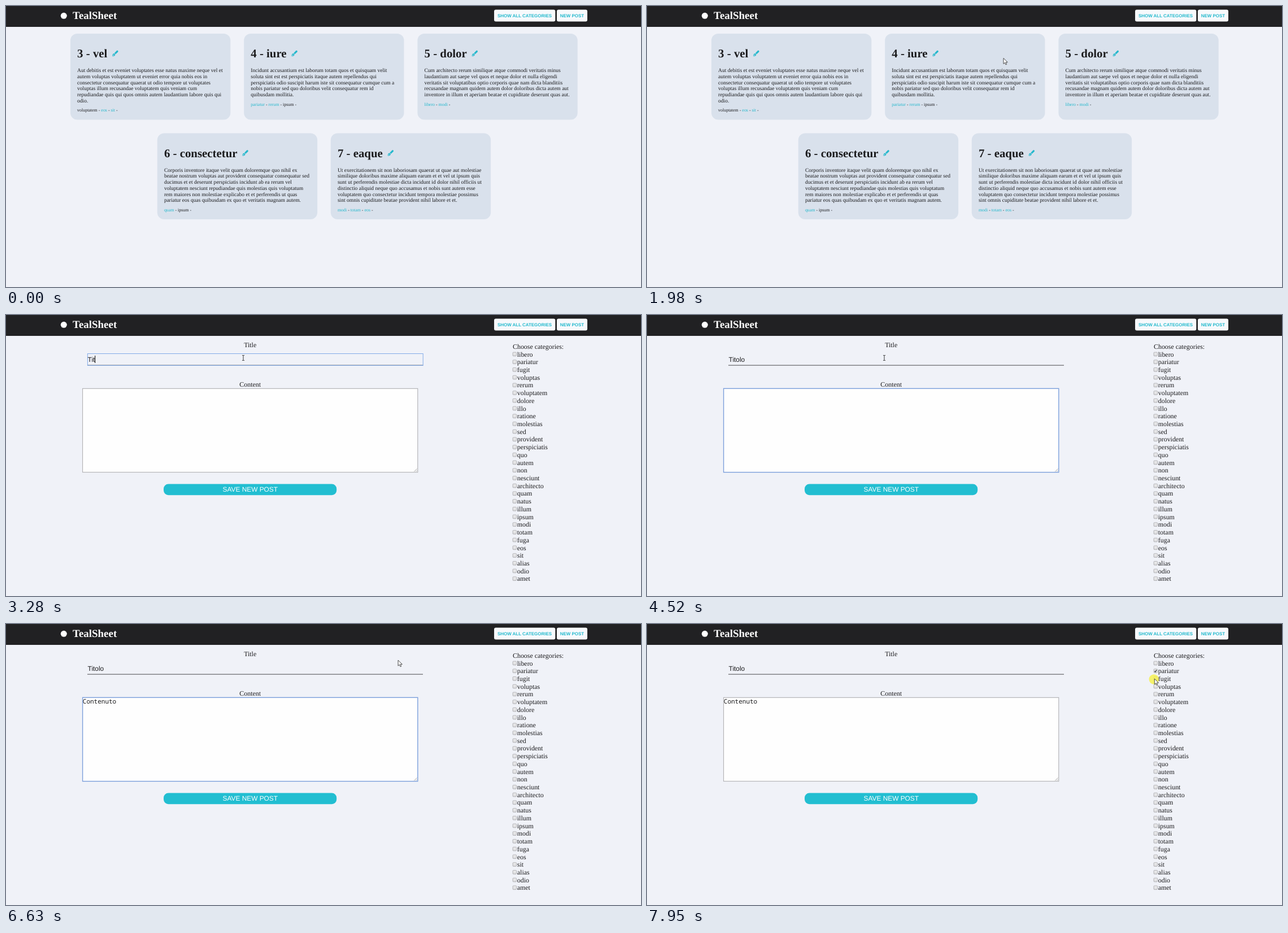
Write an HTML page that moves like this. It is 1124x498 px and loops after 8000 ms.

```html
<!DOCTYPE html>
<html lang="en">
<head>
<meta charset="utf-8">
<title>Blog post form</title>
<style>
  html, body { margin: 0; width: 100%; height: 100%; overflow: hidden; background: #f0f2f8; }
  svg { display: block; width: 100%; height: 100%; }
  text { font-family: "Liberation Serif", Times, serif; font-size: 11.9px; fill: #1b1b1d;
         text-rendering: geometricPrecision; white-space: pre; }
  .logo { font-size: 18.95px; font-weight: bold; fill: #fff; }
  .sans { font-family: "Liberation Sans", Arial, sans-serif; }
  .mono { font-family: "Noto Sans Mono", monospace; font-size: 11px; }
  .nav { font-size: 7.95px; font-weight: bold; fill: #22b9cd; }
  .nav.hover { fill: #212123; }
  .h1 { font-size: 20.85px; font-weight: bold; }
  .body { font-size: 9.52px; }
  .tags { font-size: 7.93px; }
  .link, .pen { fill: #24b8cc; }
  .mid { text-anchor: middle; }
  .save { fill: #fff; }
</style>
</head>
<body>
<svg id="stage" viewBox="0 0 1124 498">
  <defs>
    <linearGradient id="boxFill" x2="0" y2="1">
      <stop offset="0" stop-color="#eeeeef"/><stop offset="1" stop-color="#dcdcde"/>
    </linearGradient>
  </defs>
  <rect width="1124" height="37" fill="#212123"/>
  <circle cx="102.3" cy="17.3" r="5.5" fill="#fff"/>
  <text class="logo" x="118" y="23.4">TealSheet</text>
  <rect x="864" y="6.6" width="108.3" height="20.8" rx="3" fill="#f7f9fc"/>
  <rect x="975" y="6.6" width="54" height="20.8" rx="3" fill="#f7f9fc"/>
  <text class="sans nav" x="870" y="19.7">SHOW ALL CATEGORIES</text>
  <text class="sans nav" id="newPost" x="980.7" y="19.7">NEW POST</text>

  <g id="posts"></g>

  <g id="form">
    <text class="mid" x="432.2" y="56.8">Title</text>
    <rect x="144" y="88.6" width="594" height="1" fill="#4a4a4d"/>
    <rect id="titleRing" x="144.4" y="68.5" width="593.8" height="21" fill="none" stroke="#82abe8"/>
    <text class="sans" id="titleText" x="144.6" y="83"></text>
    <text class="mid" x="432.2" y="127.2">Content</text>
    <rect id="area" x="135.6" y="130.3" width="593.2" height="148.4" fill="#fefefe"/>
    <path d="M722.5 277.5l5-5m-2 5l2-2" stroke="#8d8d90" stroke-width=".8"/>
    <text class="mono" id="areaText" x="135.8" y="141.4"></text>
    <rect id="caret" width="1" height="13"/>
    <rect x="279" y="299.4" width="306.2" height="19.8" rx="8.5" fill="#22bed1"/>
    <text class="sans save mid" x="432.3" y="313.4">SAVE NEW POST</text>
    <text x="897" y="59.9">Choose categories:</text>
    <g id="boxes"></g>
    <path id="tick" d="M898.3 83.4l1.4 1.6 2.3-3.6" fill="none" stroke="#333" stroke-width="1.2"/>
  </g>

  <circle id="click" r="8.8" fill="#f7f13c" opacity=".75"/>
  <g id="pointer">
    <path id="arrow" d="M0 0v10l2.4-2.2 1.6 3.7 1.7-.8-1.6-3.5h3.2z" fill="#fff" stroke="#222" stroke-width=".8"/>
    <path id="beam" d="M-2-4.5h1.5l.5.5.5-.5h1.5M0-4v8M-2 4.5h1.5l.5-.5.5.5h1.5" fill="none" stroke="#222" stroke-width=".9"/>
    <path id="hand" d="M-1 6V.2q0-1 1-1t1 1v4l4 .9q1 .3 1 1.3-.1 3.2-1.4 5.3h-5l-3.2-4.6q0-1.4 2.6.6z" fill="#fff" stroke="#222" stroke-width=".8"/>
  </g>
</svg>
<script>
const LOOP = 8000;
const $ = id => document.getElementById(id);

function add(parent, tag, attrs, content = '') {
  const el = document.createElementNS('http://www.w3.org/2000/svg', tag);
  for (const key in attrs) el.setAttribute(key, attrs[key]);
  el.textContent = content;
  return parent.appendChild(el);
}

const posts = [
  [114, 49, '3 - vel', ['Aut debitis et est eveniet voluptates esse natus maxime neque vel et',
    'autem voluptas voluptatem ut eveniet error quia nobis eos in',
    'consectetur consequatur quaerat ut odio tempore ut voluptates',
    'voluptas illum recusandae voluptatem quis veniam cum',
    'repudiandae quis qui quos omnis autem laudantium labore quis qui',
    'odio.'], ['voluptatem', 'eos', 'sit'], 'voluptatem'],
  [421.2, 49, '4 - iure', ['Incidunt accusantium est laborum totam quos et quisquam velit',
    'soluta sint est est perspiciatis itaque autem repellendus qui',
    'perspiciatis odio suscipit harum iste sit consequatur cumque cum a',
    'nobis pariatur sed quo doloribus velit consequatur rem id',
    'quibusdam mollitia.'], ['pariatur', 'rerum', 'ipsum'], 'ipsum'],
  [728.4, 49, '5 - dolor', ['Cum architecto rerum similique atque commodi veritatis minus',
    'laudantium aut saepe vel quos et neque dolor et nulla eligendi',
    'veritatis sit voluptatibus optio corporis quae nam dicta blanditiis',
    'recusandae magnam quidem autem dolor doloribus dicta autem aut',
    'inventore in illum et aperiam beatae et cupiditate deserunt quas aut.'], ['libero', 'modi']],
  [267.8, 225.5, '6 - consectetur', ['Corporis inventore itaque velit quam doloremque quo nihil ex',
    'beatae nostrum voluptas aut provident consequatur consequatur sed',
    'ducimus et et deserunt perspiciatis incidunt ab ea rerum vel',
    'voluptatem nesciunt repudiandae quis molestias quis voluptatum',
    'rem maiores non molestiae explicabo et et perferendis ut quas',
    'pariatur eos quas quibusdam ex quo et veritatis magnam autem.'], ['quam', 'ipsum'], 'ipsum'],
  [574.8, 225.5, '7 - eaque', ['Ut exercitationem sit non laboriosam quaerat ut quae aut molestiae',
    'similique doloribus maxime aliquam earum et et vel ut ipsum quis',
    'sunt ut perferendis molestiae dicta incidunt id dolor nihil officiis ut',
    'distinctio aliquid neque quo accusamus et nobis sunt autem esse',
    'voluptatem quo consectetur incidunt tempora molestiae possimus',
    'sint omnis cupiditate beatae provident nihil labore et et.'], ['modi', 'totam', 'eos']]
];

const PEN = 'M79 283q-15 5-20 20L0 480l5 5 93-93q-4-40 30-40t32 32-40 30l-93 93 5 5 ' +
  '177-59q15-5 20-20l33-84-99-99zM369 28L186 228l98 98 199-183c85-76-39-199-114-115z';

function drawPost([cardX, cardY, title, lines, tags, plain]) {
  const x = cardX + 12.1, top = cardY + 68.1, step = 10.75, g = $('posts');
  add(g, 'rect', { x: cardX, y: cardY, width: 283.3, height: 152.5, rx: 12, fill: '#d9e1ec' });
  const head = add(g, 'text', { class: 'h1', x, y: cardY + 42.2 }, title);
  const penX = x + head.getComputedTextLength() + 8.6;
  add(g, 'path', { class: 'pen', d: PEN, transform: `translate(${penX} ${cardY + 29.8}) scale(.0208)` });
  lines.forEach((line, i) => add(g, 'text', { class: 'body', x, y: top + step * i }, line));
  const row = add(g, 'text', { class: 'tags', x, y: top + step * lines.length + 5.7 });
  for (const tag of tags) {
    add(row, 'tspan', tag === plain ? {} : { class: 'link' }, tag);
    add(row, 'tspan', {}, ' - ');
  }
}
posts.forEach(drawPost);

const categories = ('libero pariatur fugit voluptas rerum voluptatem dolore illo ratione molestias sed ' +
  'provident perspiciatis quo autem non nesciunt architecto quam natus illum ipsum modi totam fuga ' +
  'eos sit alias odio amet').split(' ');
categories.forEach((name, i) => {
  const y = 69.6 + 13.72 * i;
  add($('boxes'), 'rect', { x: 897.1, y: y - 3.5, width: 6.4, height: 6.6, rx: 1,
    fill: 'url(#boxFill)', stroke: '#a3a3a6', 'stroke-width': .8 });
  add($('boxes'), 'text', { x: 904.8, y: y + 3.9 }, name);
});

// Pointer waypoints: time, x, y
const path = [
  [210, 1058, 362], [520, 1040, 160], [750, 1010, 30], [830, 1003, 18], [1630, 1003, 18],
  [1975, 631, 92.5], [2204, 631, 92.5], [2205, 598, 97], [2430, 420, 76], [6260, 420, 76],
  [6490, 640, 60], [6860, 898, 80], [7040, 898, 80], [7250, 899, 85], [7560, 899, 85],
  [7640, 899, 96], [7790, 898.3, 97]
];
const titleKeys = [2900, 3050, 3280, 3440, 3590, 3820];
const areaKeys = [4670, 4750, 4910, 4980, 5130, 5210, 5300, 5450, 5620];
const clicks = [[840, 990], [2430, 2575], [7420, 7645], [7950, LOOP]];
const BLINK = 530;

const within = (t, from, to) => t >= from && t < to;
const show = (id, on) => $(id).setAttribute('visibility', on ? 'inherit' : 'hidden');
const place = (id, x, y) => $(id).setAttribute('transform', `translate(${x} ${y})`);

const tick = t => 65 + Math.floor((t - 60) / 76.5) * 76.5;

function pointerAt(t) {
  const next = path.findIndex(p => p[0] > t);
  if (next === 0) return path[0].slice(1);
  if (next < 0) return path[path.length - 1].slice(1);
  const [t0, x0, y0] = path[next - 1], [t1, x1, y1] = path[next];
  const k = (t - t0) / (t1 - t0);
  return [x0 + (x1 - x0) * k, y0 + (y1 - y0) * k];
}

function type(id, word, keys, t) {
  const el = $(id), typed = word.slice(0, keys.filter(k => k <= t).length);
  if (el.textContent !== typed) el.textContent = typed;
  return typed ? el.getComputedTextLength() : 0;
}

function drawForm(t) {
  const inTitle = within(t, 2430, 3970), inArea = within(t, 3970, 7490);
  const titleWidth = type('titleText', 'Titolo', titleKeys, t);
  const areaWidth = type('areaText', 'Contenuto', areaKeys, t);
  show('titleRing', inTitle);
  $('area').setAttribute('stroke', inArea ? '#7c9fdb' : '#a9a9ac');
  $('area').setAttribute('stroke-width', inArea ? 1.4 : 1);
  const lastKey = [2430, 3970, ...titleKeys, ...areaKeys].filter(k => k <= t).reduce((a, b) => Math.max(a, b), 0);
  const lit = Math.floor((t - lastKey) / BLINK) % 2 === 0;
  show('caret', (inTitle || inArea) && lit);
  place('caret', inTitle ? 144.4 + titleWidth : 135.6 + Math.max(areaWidth - .8, 0), inTitle ? 72 : 131);
  show('tick', t >= 7570);
}

function drawPointer(t) {
  const [x, y] = pointerAt(tick(t)), formOpen = t >= 2210;
  const overButton = !formOpen && within(x, 975, 1029) && within(y, 6, 28);
  const overInput = formOpen && within(x, 144, 738) && within(y, 68, 90);
  $('newPost').classList.toggle('hover', overButton);
  show('pointer', t >= 210);
  show('hand', overButton);
  show('beam', overInput);
  show('arrow', !overButton && !overInput);
  place('pointer', x, y);
  show('click', clicks.some(([from, to]) => within(t, from, to)));
  place('click', x - 1, y + 1);
}

function render(t) {
  show('posts', t < 2210);
  show('form', t >= 2210);
  drawForm(t);
  drawPointer(t);
}

const start = performance.now();
function frame() {
  render((performance.now() - start) % LOOP);
  requestAnimationFrame(frame);
}
frame();
</script>
</body>
</html>
```
